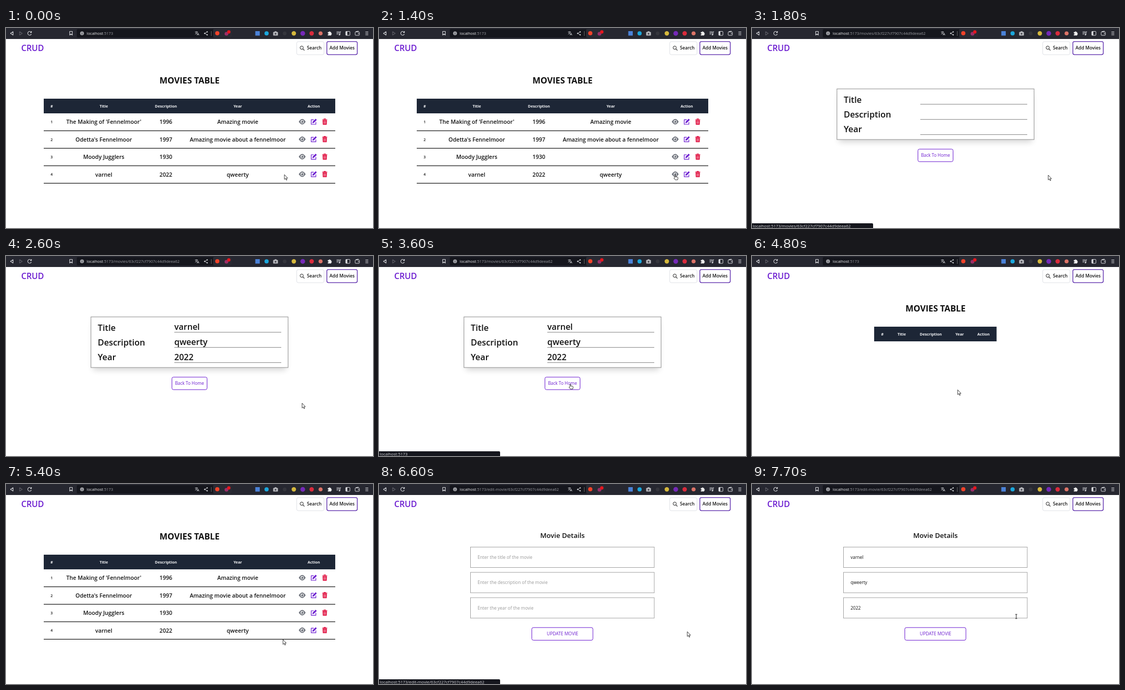
An HTML page for the animation above (8000 ms loop, 700 by 382 pixels).

```html
<!DOCTYPE html>
<html lang="en">
<head>
<meta charset="utf-8">
<title>CRUD</title>
<style>
html, body { margin: 0; width: 100%; height: 100%; overflow: hidden; background: #fff; }
svg { display: block; width: 700px; height: 382px; font-family: "Open Sans", "Noto Sans", sans-serif; }
text { white-space: pre; }
</style>
</head>
<body>
<svg id="stage" viewBox="0 0 700 382"></svg>
<script>
const PURPLE = '#6b1bd0', INK = '#111', NAVY = '#1d2636', LIGHT = '#d5d6da';
const LOOP = 8000;
const ID = '63cf227cf7907c44d9deea62';
const stage = document.getElementById('stage');

const text = (x, y, s, size, { weight = 400, fill = INK, anchor = 'start', id = '' } = {}) =>
  `<text x="${x}" y="${y}" font-size="${size}" font-weight="${weight}" fill="${fill}" text-anchor="${anchor}" id="${id}">${s}</text>`;
const mid = (x, y, s, size, weight, fill) => text(x, y, s, size, { weight, fill, anchor: 'middle' });
const box = (x, y, w, h, fill, stroke = 'none', rx = 0, sw = 1) =>
  `<rect x="${x}" y="${y}" width="${w}" height="${h}" rx="${rx}" fill="${fill}" stroke="${stroke}" stroke-width="${sw}"/>`;
const dot = (x, y, r, fill) => `<circle cx="${x}" cy="${y}" r="${r}" fill="${fill}"/>`;
const line = (d, stroke = LIGHT, sw = 1.1, fill = 'none') =>
  `<path d="${d}" fill="${fill}" stroke="${stroke}" stroke-width="${sw}" stroke-linejoin="round"/>`;
const at = (x, y, s) => `<g transform="translate(${x} ${y})">${s}</g>`;
const group = (id, s) => `<g id="${id}">${s}</g>`;

function toolbar() {
  return box(0, 0, 700, 21, '#262730') + box(135, 2, 296, 16, '#15161d', 'none', 2) +
    line('M13.5 7V13.5L8.5 10.2Z') + line('M26 7V13.5L31 10.2Z', '#5b5c64') +
    line('M48 8A3.6 3.6 0 1 0 48.4 11.5M48.6 6V8.6H46') +
    line('M121.5 6.5H126.5V13.5L124 11.3L121.5 13.5Z') +
    dot(145, 10.2, 3.6, '#a5a6ab') + line('M145 9.7V12.2M145 8V8.8', '#15161d', 0.9) +
    `<text y="13" x="154" font-size="7.45" fill="#f2f2f4">localhost<tspan id="url" fill="#9a9ba1"></tspan></text>` +
    line('M360.5 7.5H366M363.2 6.3V7.5M365 7.5Q364 10.5 360.7 12M361.5 8.5Q363 11 364.7 11.5M364.4 14L366.3 9.5L368.2 14M365.2 12.5H367.5', LIGHT, 0.8) +
    line('M383.5 7.5L379 10.2L383.5 13', LIGHT, 0.8) +
    [[383.7, 7.4], [379, 10.2], [383.7, 13]].map(([x, y]) => dot(x, y, 1.2, LIGHT)).join('') +
    line('M391.5 6V15', '#777', 0.8) +
    box(395, 2, 36, 16, '#292a33', 'none', 2) +
    dot(403, 10, 4, '#f0432a') + dot(420.5, 11, 3.6, '#9a2f68') + dot(425, 7.5, 3.2, '#e5171f') +
    box(475.5, 6, 8.5, 8.5, '#4b82d8') + dot(497, 10.3, 4, '#1ba7dc') +
    line('M510 8H512L512.8 6.7H515.6L516.4 8H518.2V14H510Z', '#b9babf', 0.8, '#b9babf') + dot(514.1, 11, 1.7, '#44454d') +
    dot(531.5, 10.3, 3.6, '#34353c') + dot(549, 10.3, 4.2, '#d5b83d') + dot(566, 10.3, 4.5, '#7529b8') +
    dot(583, 10.3, 4.2, '#d92b3c') + dot(600, 10.3, 3.8, '#dd7468') +
    line('M614 8H616A1.2 1.2 0 1 1 618.4 8H620V10A1.2 1.2 0 1 1 620 12.4V14H614V12.3A1.2 1.2 0 1 0 614 10Z', '#eee', 0.5, '#eee') +
    line('M630.5 7.2H636M630.5 9.5H636M630.5 11.8H633.5M637 12.5V7.2H639') + dot(636, 12.7, 1.4, LIGHT) +
    box(648, 6.5, 8, 7.5, 'none', LIGHT, 1) + box(648, 6.5, 3, 7.5, LIGHT) +
    box(666, 7.5, 8, 6.5, 'none', LIGHT, 1) + line('M667 7L672.5 5.8M671 10.8H674') +
    line('M685.5 7.5H691M685.5 10.2H691M685.5 13H691');
}

function siteHeader() {
  return text(29, 44.3, 'CRUD', 15.8, { weight: 600, fill: PURPLE }) +
    box(554.5, 26, 52, 25, '#fff', '#dfe1e6', 3) +
    `<circle cx="564" cy="37.6" r="3.1" fill="none" stroke="#222"/>` + line('M566.3 39.9L569.2 42.8', '#222') +
    text(574, 41.4, 'Search', 8.6, { weight: 600 }) +
    box(612, 25.8, 58, 25, '#fff', '#5420a8', 3, 1.3) + mid(641, 40.5, 'Add Movies', 8.6, 600);
}

const heading = mid(350, 105.8, 'MOVIES TABLE', 16.2, 700);

function tableHead(x, w, cols) {
  const names = ['#', 'Title', 'Description', 'Year', 'Action'];
  return box(x, 135, w, 28, NAVY) + names.map((n, i) => mid(cols[i], 151.7, n, 7.3, 700, '#f4f5f7')).join('');
}

const eye = line('M-6.3 0Q0 -10 6.3 0Q0 10 -6.3 0Z', '#6b6f78', 0.5, '#6b6f78') +
  dot(0, 0, 3.2, '#fff') + dot(0, 0, 2.2, '#6b6f78') + dot(-0.9, -0.9, 0.8, '#fff');
const pencil = line('M0 -3.8H-4.8V5H4V0.5', PURPLE, 1.2) +
  line('M-2.2 2.4L-1.7 0L3.6 -5.3L5.4 -3.5L0.1 1.8Z', PURPLE, 0.7, PURPLE);
const trash = line('M-4.7 -4H4.7M-1.6 -4.2V-5.3H1.6V-4.2', '#e0103f', 1.2) +
  line('M-3.9 -2.7H3.9L3.4 5.4H-3.4Z', '#e0103f', 0.6, '#e0103f') +
  line('M-1.7 -1.3V4M0 -1.3V4M1.7 -1.3V4', '#fff', 0.6);

const movies = [
  ["The Making of 'Fennelmoor'", '1996', 'Amazing movie'],
  ["Odetta's Fennelmoor", '1997', 'Amazing movie about a fennelmoor'],
  ['Moody Jugglers', '1930', ''],
  ['varnel', '2022', 'qweerty']
];

function fullTable() {
  const cols = [87, 186.5, 305, 442, 587];
  return tableHead(72, 556, cols) + movies.map((m, i) => {
    const y = 179.5 + i * 33.4;
    return mid(87, y + 2.6, i + 1, 7.1, 600) +
      m.map((s, k) => mid(cols[k + 1], y + 3.9, s, 10.65, 600)).join('') +
      at(565, y - 0.5, eye) + at(587, y - 0.5, pencil) + at(608, y - 0.5, trash) +
      box(72, y + 16.2, 556, 1.2, '#111');
  }).join('');
}

const entry = ['varnel', 'qweerty', '2022'];

function viewPage() {
  return `<rect x="166" y="128" width="368" height="90" fill="#000" opacity=".16" filter="url(#soft)"/>` +
    box(162, 116.3, 376, 96.7, '#fff', '#8c8c8c') +
    ['Title', 'Description', 'Year'].map((s, i) =>
      text(175, 142.6 + i * 28.2, s, 16.3, { weight: 600 }) + box(321, 145.2 + i * 29, 204, 0.9, '#777')).join('') +
    group('viewData', entry.map((s, i) => text(321, 141.2 + i * 28.7, s, 16, { weight: 600 })).join('')) +
    box(316.5, 231.3, 67, 24, '#fff', PURPLE, 3) + mid(350, 246.4, 'Back To Home', 8.3, 400, PURPLE);
}

function editPage() {
  const rows = (list, fill) => list.map((s, i) => text(188, 143 + i * 48.4, s, 8.45, { fill })).join('');
  return mid(350, 102.6, 'Movie Details', 13.1, 600) +
    [0, 1, 2].map(i => box(174.5, 120.5 + i * 48.3, 350.5, 39, '#fff', '#999', 0, 0.9)).join('') +
    group('hints', rows(['title', 'description', 'year'].map(s => `Enter the ${s} of the movie`), '#999')) +
    group('editData', rows(entry, INK)) +
    box(291.5, 274.2, 116.5, 24.2, '#fff', PURPLE, 3) + mid(350, 289.4, 'UPDATE MOVIE', 8.5, 400, PURPLE);
}

const arrow = line('M0 0V9.2L2.1 7.3L3.6 10.6L5 10L3.6 6.8H6.3Z', '#111', 0.8, '#fff');
const hand = line('M-0.8 5V0.4Q0 -0.6 0.8 0.4V3.2L4.4 3.9Q5.4 4.2 5.3 5.2L4.6 9H0L-2.6 5.8Q-2.2 4.6 -0.8 5.6', '#111', 0.8, '#fff');
const beam = line('M-1.8 -4H1.8M0 -4V4M-1.8 4H1.8', '#222', 1);

stage.innerHTML =
  `<defs><filter id="soft" x="-10%" y="-30%" width="120%" height="160%"><feGaussianBlur stdDeviation="6"/></filter></defs>` +
  box(0, 0, 700, 382, '#fff') + siteHeader() +
  group('home', heading + group('full', fullTable()) +
    group('empty', tableHead(233, 233.5, [248.5, 285.5, 341, 396, 441.5]))) +
  group('view', viewPage()) + group('edit', editPage()) + toolbar() +
  group('status', `<path d="M0 373H229Q231 373 231 375V382H0Z" fill="#15161d"/>` +
    text(1.5, 380.8, '', 7.85, { fill: '#d0d1d5', id: 'link' })) +
  group('cursor', group('arrow', arrow) + group('hand', hand) + group('beam', beam));

const el = id => document.getElementById(id);
const show = (id, on) => el(id).setAttribute('display', on ? 'inline' : 'none');
const within = (t, a, b) => t >= a && t < b;

// time, x, y
const track = [
  [0, 531, 280], [600, 531, 280], [1000, 551, 283], [1300, 565, 281], [2600, 565, 281],
  [2750, 530, 297], [2900, 440, 278], [3100, 365, 245], [4750, 365, 245], [5000, 499, 297],
  [5300, 499, 297], [5400, 528, 297], [5500, 555, 305], [5600, 569, 307], [5850, 569, 307],
  [6000, 588, 282], [7350, 588, 282], [7700, 504, 253], [LOOP, 504, 253]
];

function cursorAt(t) {
  const i = track.findIndex(p => p[0] > t);
  const [a, x, y] = track[i - 1], [b, u, v] = track[i];
  const k = (t - a) / (b - a);
  return [x + (u - x) * k, y + (v - y) * k];
}

// start, end, link path
const links = [[1420, 2120, '/movies/' + ID], [3250, 4480, ''], [6230, 7050, '/edit-movie/' + ID]];

function draw(t) {
  const page = within(t, 1700, 3900) ? 'view' : t >= 6500 ? 'edit' : 'home';
  ['home', 'view', 'edit'].forEach(p => show(p, p === page));
  const loading = within(t, 3900, 5400);
  show('full', !loading);
  show('empty', loading);
  show('viewData', t >= 2600);
  show('hints', t < 7100);
  show('editData', t >= 7100);
  el('url').textContent = ':5173' + { home: '', view: '/movies/' + ID, edit: '/edit-movie/' + ID }[page];

  const link = links.find(([a, b]) => within(t, a, b));
  show('status', link);
  if (link) {
    el('status').setAttribute('opacity', Math.min(1, (t - link[0]) / 200, (link[1] - t) / 200));
    el('link').textContent = 'localhost:5173' + link[2];
  }

  const [x, y] = cursorAt(t);
  el('cursor').setAttribute('transform', `translate(${x} ${y})`);
  const pointing = within(t, 1200, 1700) || within(t, 3050, 3900) || within(t, 5960, 6500);
  const typing = t >= 7660;
  show('hand', pointing);
  show('beam', typing);
  show('arrow', !pointing && !typing);
}

const start = performance.now();
function tick(now) {
  draw(Math.max(0, now - start) % LOOP);
  requestAnimationFrame(tick);
}
draw(0);
requestAnimationFrame(tick);
</script>
</body>
</html>
```
